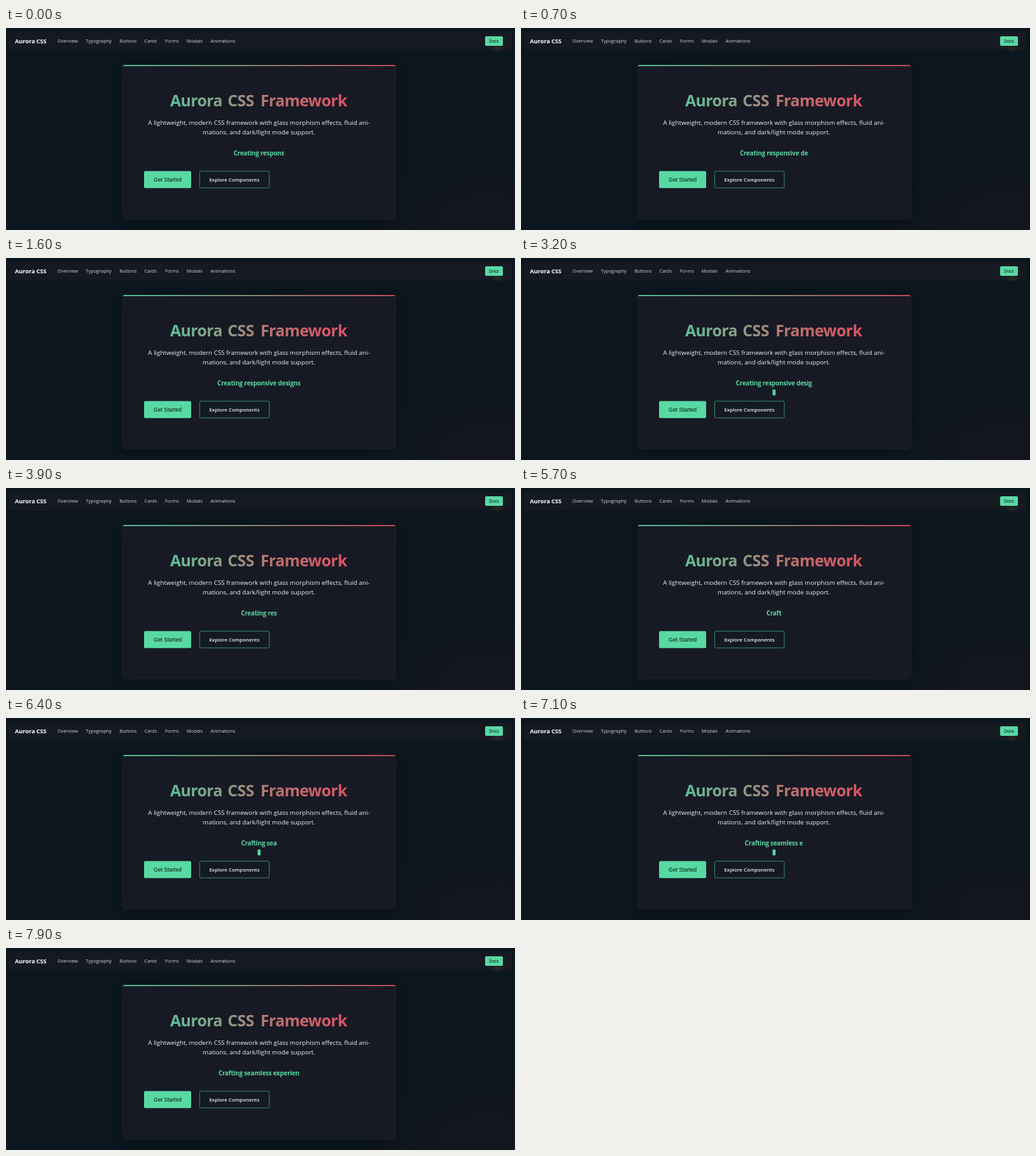
Write an HTML page that moves like this. It is 800 by 317 pixels and loops after 8 s.

```html
<!DOCTYPE html>
<html lang="en">
<head>
<meta charset="utf-8">
<title>Aurora CSS Framework</title>
<style>
  html, body { margin: 0; width: 100%; height: 100%; overflow: hidden; background: #0c161e; }
  svg { display: block; width: 100vw; height: 100vh; }
  text { font-family: "Open Sans", "Noto Sans", sans-serif; fill: #f0f1f3; white-space: pre; }
  .mid { text-anchor: middle; }
  .nav { font-size: 7.38px; fill: #d3d6da; }
  .brand { font-size: 9.35px; font-weight: 700; letter-spacing: -.12px; fill: #fff; }
  .title { font-size: 24.8px; font-weight: 700; letter-spacing: -.55px; fill: url(#titleInk); }
  .lead { font-size: 9.84px; }
  .typed { font-size: 9.75px; font-weight: 700; letter-spacing: -.17px; fill: #58d9a3; }
  .solid { font-family: "Liberation Sans", Arial, sans-serif; font-size: 8.65px; fill: #0a1414; }
  .docs { font-size: 6.8px; }
  .outline { font-size: 7.9px; font-weight: 600; fill: #f2f3f5; }
</style>
</head>
<body>
<svg viewBox="0 0 800 317" preserveAspectRatio="none">
  <defs>
    <linearGradient id="titleInk" gradientUnits="userSpaceOnUse" x1="258" x2="537" y1="0" y2="0">
      <stop stop-color="#5fbe96"/>
      <stop offset=".4" stop-color="#9a907f"/>
      <stop offset=".56" stop-color="#b9736f"/>
      <stop offset="1" stop-color="#dc5264"/>
    </linearGradient>
    <linearGradient id="stripe">
      <stop stop-color="#58d9a3"/>
      <stop offset=".5" stop-color="#98907f"/>
      <stop offset="1" stop-color="#e0505f"/>
    </linearGradient>
    <radialGradient id="glow">
      <stop stop-color="#15161f"/>
      <stop offset="1" stop-color="#15161f" stop-opacity="0"/>
    </radialGradient>
    <radialGradient id="smudge">
      <stop stop-color="#2c2c25"/>
      <stop offset="1" stop-color="#2c2c25" stop-opacity="0"/>
    </radialGradient>
    <filter id="soft" x="-20%" y="-20%" width="140%" height="140%"><feGaussianBlur stdDeviation="9"/></filter>
    <clipPath id="cardShape"><rect x="183" y="58" width="430" height="241" rx="4"/></clipPath>
  </defs>

  <rect width="800" height="317" fill="#0c161e"/>
  <ellipse cx="760" cy="300" rx="210" ry="110" fill="url(#glow)"/>
  <rect x="4" y="7" width="791" height="28" rx="4" fill="#151922"/>
  <g id="nav"><text class="brand" x="14" y="24.2">Aurora CSS</text></g>
  <ellipse cx="772" cy="32" rx="11" ry="6" fill="url(#smudge)"/>
  <rect x="753" y="13" width="28" height="15" rx="2" fill="#58d9a3"/>
  <text class="solid docs mid" x="767" y="22.8">Docs</text>

  <rect class="card" x="185" y="64" width="426" height="238" rx="4" fill="#080f16" opacity=".4" filter="url(#soft)"/>
  <rect class="card" x="183" y="58.5" width="430" height="240.5" rx="4" fill="#171a24" stroke="#1e2530" stroke-width=".8"/>
  <rect x="183" y="58" width="430" height="1.7" fill="url(#stripe)" clip-path="url(#cardShape)"/>

  <text class="title" y="123"><tspan x="258">Aurora</tspan> <tspan x="348.3">CSS</tspan> <tspan x="400">Framework</tspan></text>
  <text class="lead mid" x="397.5" y="152">A lightweight, modern CSS framework with glass morphism effects, fluid ani-</text>
  <text class="lead mid" x="397.5" y="167.4">mations, and dark/light mode support.</text>
  <text id="typed" class="typed mid" x="397.5" y="199.5"></text>

  <g id="below">
    <rect id="cursor" x="395.5" y="206.5" width="4.5" height="9" fill="#58d9a3"/>
    <rect x="217" y="224.5" width="74" height="26.8" rx="2" fill="#58d9a3"/>
    <text class="solid mid" x="254" y="241">Get Started</text>
    <rect x="304.4" y="224.7" width="109.4" height="26.2" rx="2" fill="#131a22" stroke="#45a883" stroke-width=".8"/>
    <text class="outline mid" x="359" y="241">Explore Components</text>
  </g>
</svg>
<script>
const LOOP = 8000, TICK = 100, LINE = 15;
const TYPE = 105, ERASE = 55, ERASE_AT = 3060, NEXT_AT = 5090;
const first = 'Creating responsive designs', second = 'Crafting seamless experiences';
const $ = id => document.getElementById(id);
const cards = [...document.querySelectorAll('.card')].map(el => [el, +el.getAttribute('height')]);

const links = { Overview: 81, Typography: 125.5, Buttons: 178.5, Cards: 217.5, Forms: 250, Modals: 284, Animations: 321.5 };
$('nav').innerHTML += Object.entries(links)
  .map(([name, x]) => `<text class="nav" x="${x}" y="23.4">${name}</text>`).join('');

const steps = (ms, size) => Math.max(0, Math.floor(ms / size));

function typedAt(t) {
  if (t >= NEXT_AT) return second.slice(0, steps(t - NEXT_AT, TYPE));
  if (t < ERASE_AT) return first.slice(0, 16 + steps(t + 20, TYPE));
  return first.slice(0, Math.max(0, first.length - steps(t - ERASE_AT, ERASE)));
}

function draw(now) {
  const t = Math.floor(now % LOOP / TICK) * TICK;
  const text = typedAt(t);
  const lift = text ? 0 : LINE; // the empty line collapses
  $('typed').textContent = text;
  $('below').setAttribute('transform', `translate(0 ${-lift})`);
  for (const [el, height] of cards) el.setAttribute('height', height - lift);
  $('cursor').setAttribute('opacity', t >= TICK && t % 1000 < 600 ? 1 : 0);
}

const start = performance.now();
function frame() {
  draw(performance.now() - start);
  requestAnimationFrame(frame);
}
frame();
</script>
</body>
</html>
```
